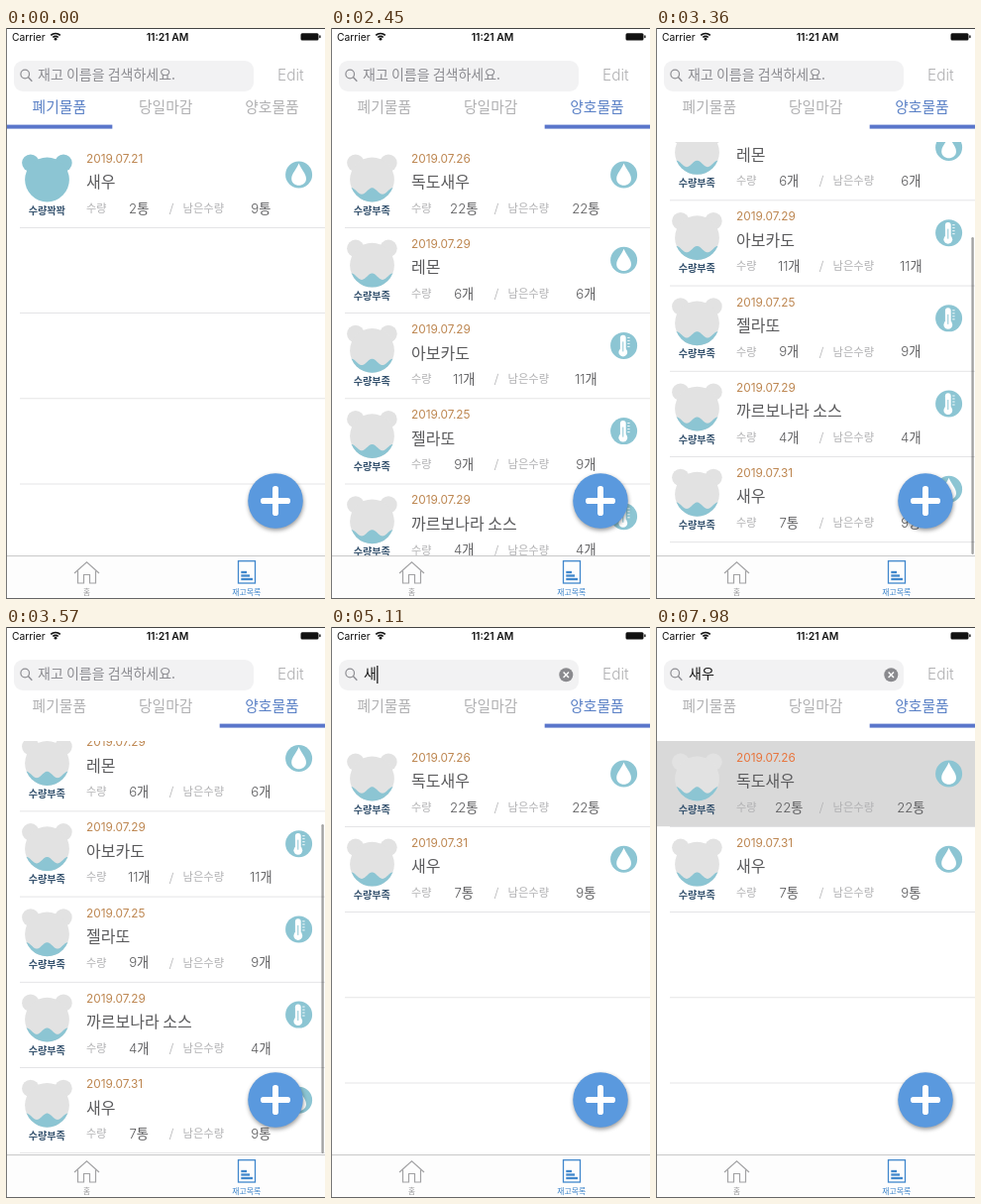
Recreate the animation shown at these times as an HTML page with a canvas. Size 322 by 576 pixels, loop 8000 ms.

```html
<!DOCTYPE html>
<html lang="ko">
<head>
<meta charset="utf-8">
<title>재고목록</title>
<style>
html, body { margin: 0; width: 100%; height: 100%; overflow: hidden; background: #fff; }
canvas { display: block; width: 322px; height: 576px; }
</style>
</head>
<body>
<canvas id="stage"></canvas>
<script>
const W = 322, H = 576, LOOP = 8000;
const LIST_TOP = 115, LIST_END = 532.5, ROW = 86.2;
const TEAL = '#8cc5d3', GRAY = '#b0b0b2', BLUE = '#5a76cb', DARK = '#5a5a5c';
const SANS = '"Noto Sans CJK KR", "Noto Sans CJK", sans-serif';
const LATIN = 'Inter, Roboto, sans-serif';
const MIXED = 'Inter, ' + SANS;

const canvas = document.getElementById('stage');
const ctx = canvas.getContext('2d');
const dpr = window.devicePixelRatio || 1;
canvas.width = W * dpr;
canvas.height = H * dpr;

const item = (date, name, count, left, icon) => ({ date: '2019.07.' + date, name, count, left, icon });
const expired = [{ ...item(21, '새우', '2통', '9통', 'drop'), full: true }];
const fresh = [
  item(26, '독도새우', '22통', '22통', 'drop'),
  item(29, '레몬', '6개', '6개', 'drop'),
  item(29, '아보카도', '11개', '11개', 'thermo'),
  item(25, '젤라또', '9개', '9개', 'thermo'),
  item(29, '까르보나라 소스', '4개', '4개', 'thermo'),
  item(31, '새우', '7통', '9통', 'drop')
];
const tabs = ['폐기물품', '당일마감', '양호물품'];
const keys = [[4830, 'ㅅ'], [4900, '새'], [5390, '생'], [5670, '새우']];
const MAX_SCROLL = fresh.length * ROW - (LIST_END - LIST_TOP);

const clamp = v => Math.max(0, Math.min(1, v));
const ramp = (t, a, b) => clamp((t - a) / (b - a));
const smooth = p => p * p * (3 - 2 * p);

function rect(x, y, w, h, fill) {
  ctx.fillStyle = fill;
  ctx.fillRect(x, y, w, h);
}

function pill(x, y, w, h, r, fill) {
  ctx.beginPath();
  ctx.roundRect(x, y, w, h, r);
  ctx.fillStyle = fill;
  ctx.fill();
}

function disc(x, y, r, fill) {
  ctx.beginPath();
  ctx.arc(x, y, r, 0, Math.PI * 2);
  ctx.fillStyle = fill;
  ctx.fill();
}

function line(points, color, width) {
  ctx.beginPath();
  points.forEach(([x, y], i) => i ? ctx.lineTo(x, y) : ctx.moveTo(x, y));
  ctx.strokeStyle = color;
  ctx.lineWidth = width;
  ctx.stroke();
}

// cy is the optical middle of the line
function text(str, x, cy, size, color, { align = 'left', weight = 400, font = SANS } = {}) {
  ctx.font = `${weight} ${size}px ${font}`;
  ctx.textAlign = align;
  ctx.fillStyle = color;
  ctx.fillText(str, x, cy + size * 0.37);
}

function scrollAt(t) {
  if (t < 2700 || t >= keys[0][0]) return 0;
  const peak = 241;
  if (t < 3010) return peak * smooth(ramp(t, 2700, 3010));
  const k = (t - 3010) * 0.0111;
  return MAX_SCROLL + (peak - MAX_SCROLL) * (1 + k) * Math.exp(-k);
}

function caretAt(t) {
  if (t < 3920) return 0;
  if (t < keys[0][0]) return 0.6;
  return 1 - ramp(t, 6160, 6400) + ramp(t, 6780, 6940) - ramp(t, 7340, 7500);
}

function stateAt(t) {
  let query = '';
  for (const [at, str] of keys) if (t >= at) query = str;
  const tab = t < 1050 ? 0 : t < 1960 ? 1 : 2;
  const rows = tab < 2 ? expired : fresh.filter(r => r.name.includes(query));
  return { query, tab, rows, scroll: scrollAt(t), picked: t >= 7630 };
}

function drawStatus() {
  text('Carrier', 6, 8.7, 10.3, '#111', { font: LATIN });
  text('11:21 AM', 163, 8.7, 10.4, '#111', { font: LATIN, weight: 600, align: 'center' });
  ctx.strokeStyle = '#111';
  ctx.lineWidth = 1.7;
  for (const r of [3.8, 6.7]) {
    ctx.beginPath();
    ctx.arc(50, 12.2, r, -Math.PI * 0.75, -Math.PI * 0.25);
    ctx.stroke();
  }
  disc(50, 11.2, 1.4, '#111');
  pill(297.5, 5.2, 18, 7.2, 1.5, '#111');
  pill(316.2, 7.3, 1.4, 3, 0.7, '#111');
}

function drawSearch(t, query) {
  const press = ramp(t, 3840, 3900) * (1 - ramp(t, 4060, 4260));
  const tone = Math.round(242 - 20 * press);
  pill(8, 33, 242, 31, 9, `rgb(${tone},${tone},${tone + 1})`);
  ctx.beginPath();
  ctx.arc(19.2, 46.5, 4.3, 0, Math.PI * 2);
  ctx.strokeStyle = '#8e8e93';
  ctx.lineWidth = 1.2;
  ctx.stroke();
  line([[22.3, 49.6], [26.3, 53.7]], '#8e8e93', 1.4);

  let end = 33;
  if (query) {
    text(query, 33, 47, 14, '#111');
    end += ctx.measureText(query).width + 0.3;
    disc(237.3, 48.2, 7, '#8a8a8e');
    line([[234.6, 45.5], [240, 50.9]], '#fff', 1.4);
    line([[240, 45.5], [234.6, 50.9]], '#fff', 1.4);
  } else {
    text('재고 이름을 검색하세요.', 32, 47, 14, '#8b8b90');
  }
  ctx.globalAlpha = clamp(caretAt(t));
  rect(end, 39, 1.3, 18, '#222');
  ctx.globalAlpha = 1;
  text('Edit', 274, 47.5, 15.4, GRAY, { font: LATIN, weight: 300 });
}

function drawTabs(active) {
  const w = W / 3;
  tabs.forEach((name, i) => text(name, i * w + 53.8, 79.9, 14.8, i === active ? '#5a80c6' : GRAY,
    { align: 'center', weight: 350 }));
  rect(active * w + (active ? 1 : 0), 97.6, w, 4, BLUE);
}

function drawBear(full) {
  const skin = full ? TEAL : '#e2e2e2';
  disc(24.8, 21.1, 8.7, skin);
  disc(58, 21.1, 8.7, skin);
  disc(41.5, 38, 22.4, skin);
  if (full) return;
  ctx.save();
  ctx.beginPath();
  ctx.arc(41.5, 38, 22.4, 0, Math.PI * 2);
  ctx.clip();
  ctx.beginPath();
  ctx.moveTo(18, 62);
  for (let x = 18; x <= 66; x++) ctx.lineTo(x, 49.5 - 3.2 * Math.cos((x - 41.5) * Math.PI * 2 / 21));
  ctx.lineTo(66, 62);
  ctx.fillStyle = TEAL;
  ctx.fill();
  ctx.restore();
}

function drawIcon(kind) {
  ctx.save();
  ctx.translate(295.6, 33);
  disc(0, 0, 13.5, TEAL);
  if (kind === 'drop') {
    ctx.beginPath();
    ctx.moveTo(0, -11.5);
    ctx.bezierCurveTo(2, -6, 7.4, -1, 7.4, 4);
    ctx.bezierCurveTo(7.4, 13, -7.4, 13, -7.4, 4);
    ctx.bezierCurveTo(-7.4, -1, -2, -6, 0, -11.5);
    ctx.fillStyle = '#fff';
    ctx.fill();
  } else {
    pill(-3.7, -10.7, 5.8, 17, 2.9, '#fff');
    disc(-0.8, 6.6, 4.4, '#fff');
    line([[-0.8, -4], [-0.8, 6]], TEAL, 1);
    for (let y = -8; y <= 1; y += 3) line([[3.6, y], [6, y]], '#fff', 0.9);
  }
  ctx.restore();
}

function drawRow(r, y, picked) {
  ctx.save();
  ctx.translate(0, y);
  if (picked) rect(0, 0, W, ROW, '#d9d9d9');
  const center = { align: 'center', weight: 350, font: MIXED };
  drawBear(r.full);
  text(r.full ? '수량꽉꽉' : '수량부족', 41.3, 68.8, 10.1, '#35526e', { align: 'center', weight: 700 });
  text(r.date, 81, 16.3, 11.8, picked ? '#e8743c' : '#bd8650', { font: LATIN });
  text(r.name, 81, 40.3, 16, DARK, { weight: 350 });
  text('수량', 81, 66.6, 11.1, GRAY, { weight: 350 });
  text(r.count, 134.2, 66.7, 13.2, DARK, center);
  text('/', 167, 66.6, 11.5, GRAY, { align: 'center' });
  text('남은수량', 178.5, 66.6, 11.3, GRAY, { weight: 350 });
  text(r.left, 257.3, 66.7, 13.2, DARK, center);
  drawIcon(r.icon);
  ctx.restore();
}

function drawList(t, { rows, scroll, picked }) {
  const view = LIST_END - LIST_TOP;
  ctx.save();
  ctx.beginPath();
  ctx.rect(0, LIST_TOP, W, view);
  ctx.clip();
  rows.forEach((r, i) => drawRow(r, LIST_TOP + i * ROW - scroll, picked && i === 0));
  const lines = Math.max(rows.length, 4);
  for (let i = 1; i <= lines; i++) rect(14, LIST_TOP + i * ROW - scroll - 0.2, W - 14, 0.8, '#dedee0');
  ctx.restore();

  const alpha = ramp(t, 2700, 2740) * (1 - ramp(t, 3640, 3900));
  if (alpha > 0) {
    const total = rows.length * ROW;
    const over = Math.max(0, scroll - MAX_SCROLL);
    const top = LIST_TOP + Math.min(scroll, MAX_SCROLL) * view / total + over;
    const size = view * view / total - over;
    pill(318.4, top + 1.5, 2.4, size - 3, 1.2, `rgba(0,0,0,${0.36 * alpha})`);
  }
}

function drawAdd() {
  ctx.save();
  ctx.shadowColor = 'rgba(0,0,0,.4)';
  ctx.shadowBlur = 4 * dpr;
  ctx.shadowOffsetX = 0.5 * dpr;
  ctx.shadowOffsetY = 2 * dpr;
  disc(272, 477, 27.8, '#5a99de');
  ctx.restore();
  pill(257, 474, 30, 6, 2.8, '#fff');
  pill(269, 462, 6, 30, 2.8, '#fff');
}

function drawBar() {
  const on = '#4087cc', off = '#a2a2a4';
  rect(0, LIST_END, W, H - LIST_END, '#fdfdfd');
  rect(0, LIST_END - 0.2, W, 0.8, '#b8b8ba');
  line([[69, 550], [81.5, 538.7], [94, 550]], off, 1.2);
  line([[72.5, 547.5], [72.5, 560], [78.5, 560], [78.5, 551.5], [84.5, 551.5], [84.5, 560], [90.5, 560], [90.5, 547.5]], off, 1.2);
  text('홈', 81.5, 568.7, 7.6, '#98989a', { align: 'center' });
  ctx.strokeStyle = on;
  ctx.lineWidth = 1.3;
  ctx.strokeRect(234.5, 537.7, 17, 22.3);
  for (const [y, end] of [[549, 243], [552.5, 246], [556, 249]]) line([[237.3, y], [end, y]], on, 2.3);
  text('재고목록', 242.7, 568.7, 7.9, on, { align: 'center', weight: 500 });
}

function drawEdges() {
  rect(0, 0, W, 1, '#444');
  rect(0, 0, 1, H, '#777');
  rect(0, H - 1, W, 1, '#666');
}

function draw(t) {
  const state = stateAt(t);
  ctx.setTransform(dpr, 0, 0, dpr, 0, 0);
  rect(0, 0, W, H, '#fff');
  drawStatus();
  drawSearch(t, state.query);
  drawTabs(state.tab);
  drawList(t, state);
  drawAdd();
  drawBar();
  drawEdges();
}

const start = performance.now();
function tick() {
  draw((performance.now() - start) % LOOP);
  requestAnimationFrame(tick);
}
tick();
</script>
</body>
</html>
```
